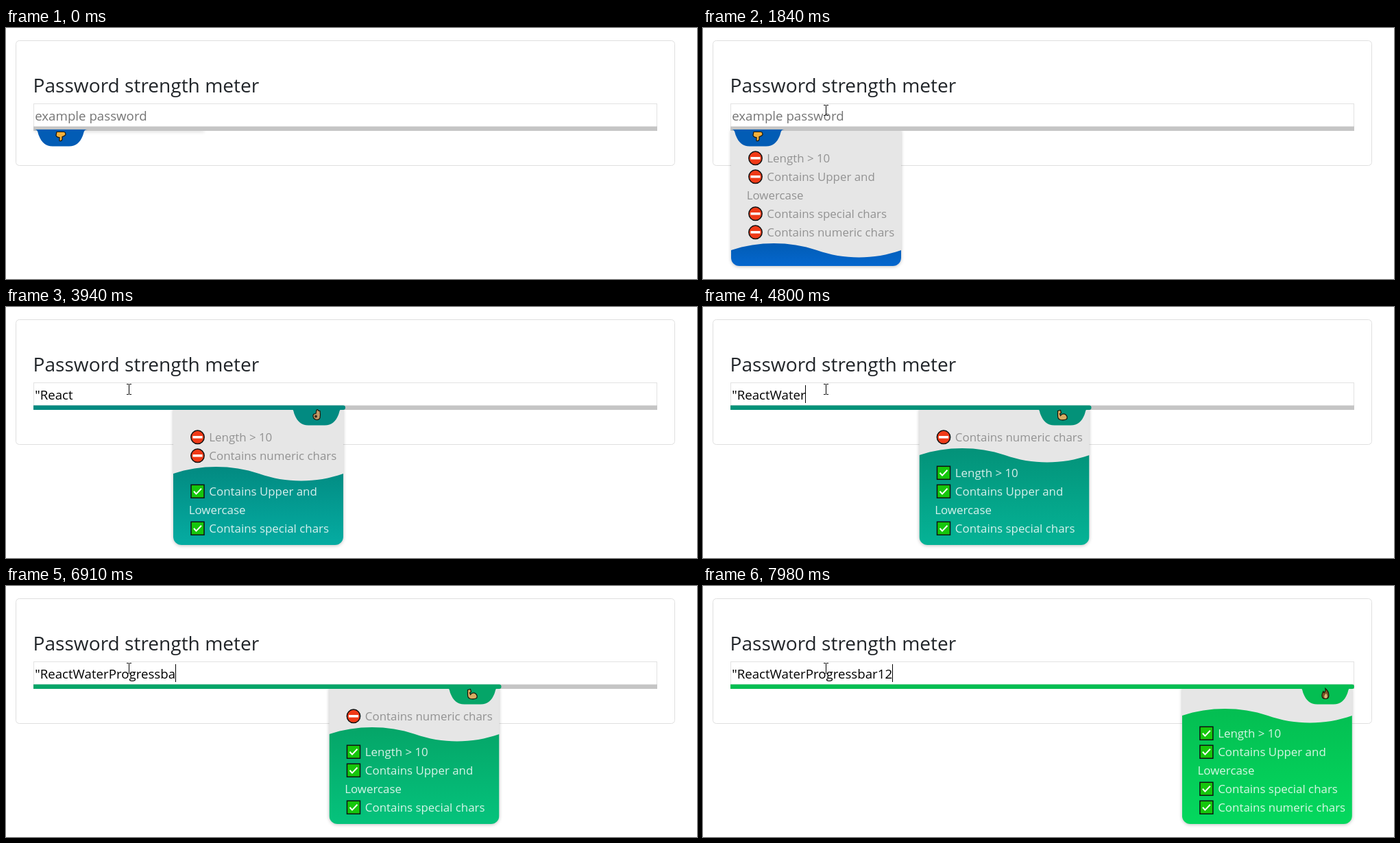
Animation of 1008 by 366 pixels, one loop 8000 ms. Source, as an HTML page with a canvas:

```html
<!DOCTYPE html>
<html lang="en">
<head>
<meta charset="utf-8">
<title>Password strength meter</title>
<style>
  html, body { margin: 0; width: 100%; height: 100%; overflow: hidden; background: #fff; }
  canvas { display: block; }
</style>
</head>
<body>
<canvas id="stage" width="1008" height="366"></canvas>
<script>
const ctx = document.getElementById('stage').getContext('2d');
const LOOP = 8000, STEP = 76;
const FAMILY = '"Open Sans", "Noto Sans", sans-serif';
const BAR = { x: 40, y: 143.5, w: 910, h: 6.5 };
const PANEL = { y: 148, w: 248, h: 199 };
const LINE = 27;

const PASSWORD = '"ReactWaterProgressbar12';
const KEY_TIMES = [2140, 2440, 2690, 3050, 3320, 3440, 4030, 4260, 4490, 4570, 4720, 5030,
  5180, 5350, 5440, 5590, 5910, 6050, 6360, 6600, 6910, 7300, 7750, 7900];
const CARET_OFF = [[0, 1310], [1840, 2140], [3940, 4030], [7150, 7300], [7610, 7750]];

// Each level is one more rule fulfilled; lag delays its transition.
const LEVELS = [
  { at: 0, lag: 0, top: [2, 92, 181], bottom: [4, 103, 206], icon: 'down' },
  { at: 2140, lag: 30, top: [2, 118, 158], bottom: [5, 140, 188], icon: 'down' },
  { at: 2690, lag: 48, top: [2, 138, 129], bottom: [5, 172, 162], icon: 'okay' },
  { at: 4720, lag: 26, top: [5, 165, 104], bottom: [5, 195, 124], icon: 'arm' },
  { at: 7750, lag: -5, top: [4, 190, 82], bottom: [4, 216, 94], icon: 'fire' }
];

const RULES = [
  { lines: ['Length > 10'], level: 3 },
  { lines: ['Contains Upper and', 'Lowercase'], level: 2 },
  { lines: ['Contains special chars'], level: 1 },
  { lines: ['Contains numeric chars'], level: 4 }
];

const ICONS = {
  down: { fill: '#f3b13c', shape: 'M-6-6L4-6Q7-6 7-2 6 0 2 1L2 5Q1 8-2 7L-2 2Q-6 2-7-1Z' },
  okay: { fill: '#c39a68', shape: 'M-5 1Q-5-2-1-2L0-7Q2-9 3-6L5-6Q6 0 5 4 4 7 0 7-5 6-5 1Z',
    inner: 'M-3 2A2 2 0 1 0 1 2 2 2 0 1 0-3 2Z', innerFill: '#3a2a1c' },
  arm: { fill: '#d8ac62', shape: 'M-7-6L-3-7-2-3-4-2-3 1Q0-3 4-1 8 2 6 6 2 8-3 7-7 6-7 1Z' },
  fire: { fill: '#7c5528', shape: 'M0-8Q5-4 5 2 5 7 0 7-5 7-5 2-5-1-3-4L-2-2Q1-4 0-8Z',
    inner: 'M1-1Q4 3 2 6L-1 6Q-3 3 1-1Z', innerFill: '#d9b878' }
};

const clamp = v => Math.max(0, Math.min(1, v));
const mix = (a, b, p) => a + (b - a) * p;
const mixColor = (a, b, p) => `rgb(${a.map((v, i) => Math.round(mix(v, b[i], p)))})`;

// The CSS "ease" curve.
function ease(x) {
  const bezier = (u, a, b) => 3 * u * (1 - u) ** 2 * a + 3 * u * u * (1 - u) * b + u ** 3;
  let lo = 0, hi = 1;
  for (let i = 0; i < 20; i++) {
    const mid = (lo + hi) / 2;
    if (bezier(mid, .25, .25) < x) lo = mid; else hi = mid;
  }
  return bezier(lo, .1, 1);
}

const steps = (t, start) => Math.floor((t - start) / STEP);

function progress(t, start, lag, duration) {
  if (t < start) return 0;
  const p = clamp((steps(t, start) * STEP - lag) / duration);
  return p === 1 ? 1 : ease(p);
}

function text(str, x, y, size, color) {
  ctx.font = `${size}px ${FAMILY}`;
  ctx.fillStyle = color;
  ctx.fillText(str, x, y);
}

function rounded(x, y, w, h, radii) {
  ctx.beginPath();
  ctx.roundRect(x, y, w, h, radii);
}

function strokeLine(points, color, width) {
  ctx.beginPath();
  points.forEach(([x, y]) => ctx.lineTo(x, y));
  ctx.strokeStyle = color;
  ctx.lineWidth = width;
  ctx.stroke();
}

function drawCard() {
  ctx.lineWidth = 1;
  ctx.strokeStyle = '#dfdfdf';
  rounded(14.5, 18.5, 961, 182, 5);
  ctx.stroke();
  text('Password strength meter', 39.5, 94, 28.1, '#212529');
  ctx.strokeStyle = '#e2e2e2';
  ctx.strokeRect(40.5, 110.5, 909, 34);
}

function drawInput(t) {
  const typed = PASSWORD.slice(0, KEY_TIMES.filter(k => k <= t).length);
  text(typed || 'example password', 42.2, 135, 18.7, typed ? '#000' : '#757575');
  if (CARET_OFF.some(([from, to]) => t >= from && t < to)) return;
  const x = Math.round(42 + ctx.measureText(typed).width);
  ctx.fillStyle = '#000';
  ctx.fillRect(x, 114, 1, 26);
}

function drawMark(x, y, passed) {
  ctx.strokeStyle = '#111';
  ctx.lineWidth = 1.5;
  if (passed) {
    ctx.fillStyle = '#16c60c';
    ctx.fillRect(x - 9.5, y - 9.5, 19, 19);
    ctx.strokeRect(x - 9.5, y - 9.5, 19, 19);
    strokeLine([[x - 5.5, y], [x - 2, y + 3.8], [x + 5.5, y - 4]], '#fff', 2);
  } else {
    ctx.fillStyle = '#f03a17';
    ctx.beginPath();
    ctx.arc(x, y, 9.7, 0, 7);
    ctx.fill();
    ctx.stroke();
    ctx.fillStyle = '#fff';
    ctx.fillRect(x - 7, y - 1.75, 14, 3.5);
  }
}

function drawRules(rules, left, baseline, passed) {
  const color = passed ? 'rgba(255,255,255,.84)' : '#929292';
  for (const rule of rules) {
    drawMark(left + 35.5, baseline - 6.2, passed);
    rule.lines.forEach((line, i) => {
      text(line, left + (i ? 22.7 : 52.3), baseline, 16.9, color);
      baseline += LINE;
    });
  }
}

function drawWave(left, peak, bottom, topColor, bottomColor) {
  const height = bottom - peak;
  const fill = ctx.createLinearGradient(0, 0, 0, height);
  fill.addColorStop(0, topColor);
  fill.addColorStop(1, bottomColor);
  ctx.fillStyle = fill;
  ctx.save();
  ctx.translate(left, peak);
  ctx.beginPath();
  ctx.moveTo(0, 10);
  ctx.bezierCurveTo(40, -3.3, 85, -3.3, 125, 10);
  ctx.bezierCurveTo(165, 24, 208, 24, PANEL.w, 10);
  ctx.lineTo(PANEL.w, height);
  ctx.lineTo(0, height);
  ctx.fill();
  ctx.restore();
}

function drawPanel(left, open, level, topColor, bottomColor) {
  const failing = RULES.filter(r => r.level > level);
  const passing = RULES.filter(r => r.level <= level);
  const countLines = rules => rules.reduce((n, r) => n + r.lines.length, 0);
  const height = mix(2, PANEL.h, open);
  const bottom = PANEL.y + height;
  const peak = bottom - PANEL.h + 31 + LINE * countLines(failing);
  const radius = Math.min(12, height / 2);

  ctx.save();
  rounded(left, PANEL.y, PANEL.w, height, [0, 0, radius, radius]);
  ctx.shadowColor = 'rgba(0,0,0,.25)';
  ctx.shadowBlur = 5;
  ctx.shadowOffsetY = 1;
  ctx.fillStyle = '#e6e6e6';
  ctx.fill();
  ctx.shadowColor = 'transparent';
  ctx.clip();
  drawRules(failing, left, 196, false);
  drawWave(left, peak, bottom, topColor, bottomColor);
  drawRules(passing, left, bottom - 18 - LINE * (countLines(passing) - 1), true);
  ctx.restore();
}

function drawBar(end, color) {
  ctx.fillStyle = '#c5c5c5';
  ctx.fillRect(BAR.x, BAR.y, BAR.w, BAR.h);
  if (end <= BAR.x) return;
  ctx.fillStyle = color;
  rounded(BAR.x, BAR.y, end - BAR.x, BAR.h, [0, 3, 3, 0]);
  ctx.fill();
}

function drawTab(x, color, icon) {
  ctx.save();
  ctx.translate(x, PANEL.y);
  ctx.fillStyle = color;
  ctx.fill(new Path2D('M-39 0C-33 0-34 4-32 9C-28 19-22 24.5-12 24.5L12 24.5C22 24.5 28 19 32 9C34 4 33 0 39 0Z'));
  ctx.translate(0, 9.5);
  const shape = new Path2D(icon.shape);
  ctx.fillStyle = icon.fill;
  ctx.fill(shape);
  ctx.strokeStyle = '#1c1408';
  ctx.lineWidth = 1.2;
  ctx.stroke(shape);
  if (icon.inner) {
    ctx.fillStyle = icon.innerFill;
    ctx.fill(new Path2D(icon.inner));
  }
  ctx.restore();
}

function drawCursor(t) {
  if (t < 680) return;
  const p = 1 - (1 - clamp(steps(t, 680) / 5)) ** 2;
  const x = Math.round(mix(217, 179, p));
  const y = t < 1220 ? Math.round(mix(1, 112, p)) : 120;
  ctx.save();
  ctx.translate(x, y);
  ctx.fillStyle = '#000';
  if (y > 110) {
    ctx.fillRect(0, -7, 1, 14);
    for (const dy of [-8, 7]) {
      ctx.fillRect(-3, dy, 3, 1);
      ctx.fillRect(1, dy, 3, 1);
    }
  } else {
    const arrow = new Path2D('M.5.5L.5 16.5 4 13 6.5 18.5 9 17.5 6.5 12 11.5 12Z');
    ctx.fillStyle = '#fff';
    ctx.fill(arrow);
    ctx.strokeStyle = '#000';
    ctx.lineWidth = 1;
    ctx.stroke(arrow);
  }
  ctx.restore();
}

function draw(t) {
  const level = LEVELS.filter(l => l.at <= t).length - 1;
  const now = LEVELS[level], before = LEVELS[Math.max(0, level - 1)];
  const p = progress(t, now.at, now.lag, 240);
  const top = mixColor(before.top, now.top, p);
  const bottom = mixColor(before.bottom, now.bottom, p);
  const share = level ? (level - 1 + p) / 4 : 0;
  const end = BAR.x + BAR.w * share;

  ctx.fillStyle = '#fff';
  ctx.fillRect(0, 0, 1008, 366);
  drawCard();
  drawPanel(Math.max(41, end - 251), progress(t, 1220, -20, 300), level, top, bottom);
  drawBar(end, top);
  drawTab(Math.max(80, end - 42), top, ICONS[now.icon]);
  drawInput(t);
  drawCursor(t);
}

const began = performance.now();
function frame() {
  draw((performance.now() - began) % LOOP);
  requestAnimationFrame(frame);
}
frame();
</script>
</body>
</html>
```
